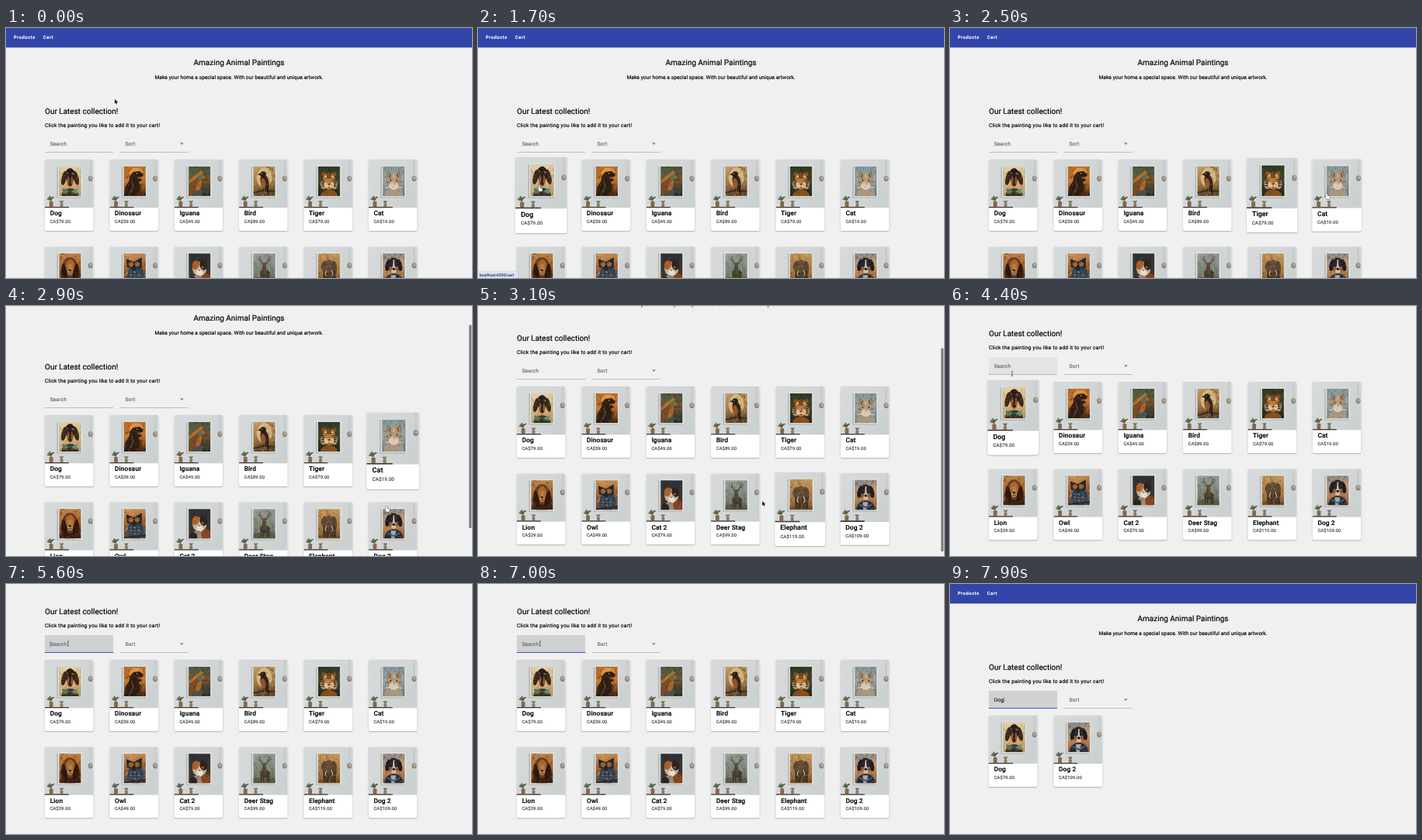
These frames come from a looping animation (600 px wide and 323 px high, 8000 ms). An HTML page with a canvas:

```html
<!DOCTYPE html>
<html lang="en">
<head>
<meta charset="utf-8">
<title>Amazing Animal Paintings</title>
<style>
html, body { margin: 0; width: 100%; height: 100%; overflow: hidden; background: #f0f0f0; }
canvas { display: block; width: 600px; height: 323px; }
</style>
</head>
<body>
<canvas id="stage"></canvas>
<script>
const W = 600, H = 323, LOOP = 8000, STEP = 100;
const canvas = document.getElementById('stage');
const ctx = canvas.getContext('2d');
const dpr = window.devicePixelRatio || 1;
canvas.width = W * dpr;
canvas.height = H * dpr;

const CARD = { x: 50, y: 170, w: 62.6, h: 92, photo: 62.5, dx: 83.35, dy: 112.3 };
const FIELD = { x: 50, y: 138, w: 88.2, h: 23 };
const FOCUS = 4600, TYPE = 7400;

// ---- drawing helpers ----
function rect(x, y, w, h, fill, r = 0) {
  ctx.fillStyle = fill;
  ctx.beginPath();
  ctx.roundRect(x, y, w, h, r);
  ctx.fill();
}
function oval(x, y, rx, ry, fill, turn = 0) {
  ctx.fillStyle = fill;
  ctx.beginPath();
  ctx.ellipse(x, y, rx, ry, turn, 0, 7);
  ctx.fill();
}
function pair(dx, y, rx, ry, fill, turn = 0, cx = 14) {
  oval(cx - dx, y, rx, ry, fill, turn);
  oval(cx + dx, y, rx, ry, fill, -turn);
}
function trace(pts) {
  ctx.beginPath();
  for (let i = 0; i < pts.length; i += 2) ctx.lineTo(pts[i], pts[i + 1]);
}
function poly(pts, fill) {
  trace(pts);
  ctx.fillStyle = fill;
  ctx.fill();
}
function line(pts, color, width) {
  trace(pts);
  ctx.strokeStyle = color;
  ctx.lineWidth = width;
  ctx.stroke();
}
// a hairline outline gives the slightly heavy strokes of the page text
function text(str, x, y, size, { weight = 400, track = 0, color = '#000', align = 'left' } = {}) {
  ctx.font = `${weight} ${size}px Roboto, sans-serif`;
  ctx.letterSpacing = `${track * size}px`;
  ctx.textAlign = align;
  ctx.fillStyle = ctx.strokeStyle = color;
  ctx.lineWidth = .18;
  ctx.fillText(str, x, y);
  ctx.strokeText(str, x, y);
}
function gradient(x0, y0, x1, y1, ...colors) {
  const g = ctx.createLinearGradient(x0, y0, x1, y1);
  colors.forEach((c, i) => g.addColorStop(i / (colors.length - 1), c));
  return g;
}
function random(seed) {
  return () => (seed = (seed * 16807) % 2147483647) / 2147483647;
}

// ---- paintings, each on a 28 x 38 sheet ----
function ears(fill, inner) {
  poly([5, 16, 6, 5, 13, 12], fill);
  poly([23, 16, 22, 5, 15, 12], fill);
  poly([7, 13, 7.3, 8, 10.5, 12], inner);
  poly([21, 13, 20.7, 8, 17.5, 12], inner);
}
function eyes(dx, y, fill, r = 1.2) {
  pair(dx, y, r, r, fill);
  pair(dx, y, r * .5, r * .6, '#0c0a08');
}
function paintDog() {
  oval(14, 38, 11, 10, '#3a2a20');
  pair(7.8, 15, 3.2, 9.5, '#3d261a', .22);
  oval(14, 11, 6.4, 9, '#211b19');
  oval(14, 19, 3.9, 7.5, '#9a5a2c');
  oval(14, 15, 1.6, 7, '#2a1f1a');
  oval(14, 23, 2.1, 1.7, '#120f0f');
  pair(3.1, 8.5, 1.1, .8, '#b56b31');
  eyes(3.2, 11.5, '#7c4a22', 1);
  poly([14, 32, 4, 28, 5, 36], '#47765f');
  poly([14, 32, 24, 28, 23, 36], '#5b8f74');
  oval(14, 32, 2, 2.2, '#294f41');
}
function paintDinosaur() {
  oval(16, 8, 9, 7, '#dd9440');
  poly([0, 38, 2, 26, 7, 18, 7, 13, 12, 7, 20, 6, 25, 10, 24, 13, 17, 14, 24, 17, 19, 20, 21, 28, 20, 38], '#2b1e17');
  poly([17, 14, 24, 13, 18, 16.5], '#a83a1d');
  oval(17, 9, .8, .8, '#f4bd45');
  line([17, 22, 22, 24, 22, 27], '#35241a', 1.5);
  line([10, 18, 12, 26, 8, 34], '#5e3c25', 1.8);
  oval(23, 36, 7, 4, '#4c2b16');
}
function paintIguana() {
  poly([0, 38, 3, 22, 9, 11, 18, 8, 26, 14, 24, 20, 16, 22, 17, 38], '#7f4a27');
  for (let i = 0; i < 8; i++) poly([1 + i * 2, 22 - i * 1.8, 1 + i * 2, 16 - i * 1.6, 5 + i * 2, 18 - i * 1.3], '#bd7633');
  oval(16, 14, 5, 3.6, '#5b6f4c');
  oval(13, 25, 3, 8, '#a8682f', .3);
  oval(19, 13, 1.2, 1.2, '#f1b74b');
  oval(19, 13, .6, .7, '#111');
  line([17, 18, 25, 17], '#3d2416', .7);
  oval(12, 34, 8, 3, '#3f554f', -.3);
}
function paintBird() {
  oval(14, 14, 10, 13, '#d8b77c');
  line([0, 34, 12, 31, 28, 32], '#3c2918', 2);
  poly([17, 32, 21, 38, 18, 22], '#201a18');
  oval(14.5, 20, 5.4, 10, '#2b201a', -.2);
  oval(12.8, 22, 3.2, 7, '#9a5529', -.15);
  oval(12.5, 10, 3.8, 3.7, '#241d1b');
  poly([9.5, 9, 5, 10.3, 9.5, 11.5], '#16110f');
  oval(11.3, 9.3, .6, .6, '#e9c07a');
  line([13, 28, 13, 32], '#1b1410', .8);
}
function paintTiger() {
  pair(6.8, 10, 2.6, 2.8, '#8a4f20');
  pair(7, 23, 4, 6.5, '#b59672');
  oval(14, 38, 11, 8, '#87501f');
  oval(14, 19, 8.5, 11, '#b87433');
  pair(3.3, 24, 3.4, 3.4, '#d9c4a4');
  pair(4, 13, 1.8, 1, '#dbc5a0');
  oval(14, 19, 2.2, 6, '#c58442');
  oval(14, 23, 1.7, 1.1, '#7a4034');
  eyes(3.8, 16, '#d9bd4a', 1);
  for (let i = 0; i < 4; i++) {
    line([11, 8 + i * 2, 14, 9.5 + i * 2, 17, 8 + i * 2], '#1d140e', .9);
    line([4, 16 + i * 3, 8, 18 + i * 2.4], '#1d140e', 1);
    line([24, 16 + i * 3, 20, 18 + i * 2.4], '#1d140e', 1);
  }
}
function paintCat() {
  oval(14, 37, 12, 13, '#a99880');
  ears('#93714f', '#b9917a');
  oval(14, 19, 9.5, 9, '#b2926e');
  oval(14, 25, 6, 5, '#d8cbb9');
  poly([12.4, 10, 15.6, 10, 15, 21, 13, 21], '#c7ab86');
  pair(5, 12, .8, 3, '#77512f', .3);
  pair(8, 20, 2.5, .5, '#77512f', .3);
  eyes(4, 18, '#8fb3ac', 1.6);
  poly([12.8, 21.5, 15.2, 21.5, 14, 23], '#a9685c');
  pair(8, 27, 4, .4, '#e9e2d6', -.2);
}
function paintLion() {
  oval(14, 25, 12, 16, '#3a2013');
  oval(14, 18, 10, 13, '#6d3b1b');
  pair(7, 24, 3, 11, '#2c170e', -.2);
  oval(14, 16, 5.6, 8.5, '#a96a33');
  oval(14, 24, 3.6, 3.6, '#c89a67');
  oval(14, 19, 1.8, 5, '#bd8446');
  oval(14, 22, 1.7, 1.2, '#2d1711');
  eyes(3, 14.5, '#e6b846', .9);
  line([11, 26, 14, 25, 17, 26], '#3a1c10', .8);
}
function paintOwl() {
  oval(15, 27, 10, 13, '#2b3f56');
  poly([3, 7, 13, 11, 23, 5, 23, 18, 13, 22, 4, 18], '#1c2737');
  pair(4, 14, 3.4, 3.4, '#94572a', 0, 13);
  eyes(4, 14, '#eeb03a', 1.6);
  poly([11.9, 15, 14.3, 15, 13, 19.5], '#15110f');
  for (let i = 0; i < 9; i++) oval(9 + (i % 3) * 5, 24 + (i / 3 | 0) * 4, 2, .8, i % 2 ? '#b8702f' : '#456e8b', .5);
  line([0, 37, 28, 34], '#3b2314', 2.2);
}
function paintCat2() {
  oval(14, 38, 11, 11, '#9d8c7e');
  ears('#33261f', '#8a4f34');
  oval(14, 20, 9, 9, '#c9b9a8');
  oval(9, 15, 4.5, 6, '#b4602a', .3);
  oval(19, 15, 4.8, 6.5, '#2b2320', -.3);
  oval(14, 25, 4.4, 3.6, '#eee4d8');
  eyes(4, 18, '#dba83c', 1.3);
  oval(14, 22, 1.2, .8, '#a95f52');
  oval(22, 33, 6, 7, '#8a4822');
  oval(6, 36, 5, 6, '#2b2320');
}
function paintDeer() {
  oval(14, 36, 18, 6, '#585a44');
  for (const s of [-1, 1]) {
    line([14 + s, 13, 14 + s * 5, 9, 14 + s * 6, 3], '#433a2e', .9);
    line([14 + s * 4, 10, 14 + s * 9, 7], '#433a2e', .8);
  }
  oval(15, 26, 6.5, 5, '#463d2f');
  poly([10, 26, 12, 14, 16, 14, 17, 26], '#51452f');
  oval(14, 15, 2.2, 3.4, '#5f4e38');
  pair(3.3, 13, 1.6, .7, '#56452f', .3);
  [10, 13, 18, 20].forEach(x => line([x, 28, x, 37], '#392f22', 1.3));
}
function paintElephant() {
  oval(14, 37, 17, 4, '#76502a');
  oval(15, 22, 9, 10, '#4d3a2b');
  [8, 12, 17, 21].forEach(x => rect(x - 1.5, 25, 3.3, 12, '#3f2f23', 1));
  pair(6, 16, 4, 6.5, '#5c4533', .15);
  oval(14, 15, 4.6, 7, '#684f3a');
  line([14, 18, 14, 27, 15.5, 33], '#54402f', 2.8);
  line([11, 21, 9, 27, 11, 29], '#ecdfc0', 1);
  line([17, 21, 19, 27, 17, 29], '#ecdfc0', 1);
  pair(3, 14, .6, .6, '#1d1510');
}
function paintDog2() {
  oval(14, 38, 12, 12, '#222b3c');
  poly([10, 28, 17, 28, 15, 38, 11, 38], '#b7a692');
  pair(7.2, 15, 3.4, 8, '#171a22', .25);
  oval(14, 14, 7, 8.5, '#20222a');
  poly([13.3, 8, 14.7, 8, 15.4, 18, 12.6, 18], '#cdbfae');
  oval(14, 21, 3.6, 4.6, '#cfc0ad');
  pair(4.3, 20, 1.8, 3.2, '#9c5a2a');
  oval(14, 20, 1.9, 1.4, '#0f0f12');
  eyes(3.5, 13, '#8b5426', .9);
  line([6, 31, 14, 35, 22, 31], '#3a6288', 2);
}

const item = (name, price, paint, ...tones) => ({ name, price, paint, tones });
const items = [
  item('Dog', 79, paintDog, '#e3d2a9', '#d6b988', '#bb935f'),
  item('Dinosaur', 39, paintDinosaur, '#b5672a', '#c57a30', '#4a2a18'),
  item('Iguana', 49, paintIguana, '#4b5844', '#6d5a36', '#2a322e'),
  item('Bird', 89, paintBird, '#c4a06a', '#a57d4b', '#5d452c'),
  item('Tiger', 79, paintTiger, '#2d3726', '#46492c', '#1d2118'),
  item('Cat', 19, paintCat, '#82969b', '#9aa5a2', '#627a80'),
  item('Lion', 29, paintLion, '#c08a4c', '#a5672f', '#3a2114'),
  item('Owl', 49, paintOwl, '#d29a5b', '#a55e29', '#31485e'),
  item('Cat 2', 79, paintCat2, '#28303a', '#3b3734', '#4f3524'),
  item('Deer Stag', 99, paintDeer, '#98a09a', '#828b7f', '#5f6450'),
  item('Elephant', 119, paintElephant, '#c9a05f', '#b0824a', '#7c5731'),
  item('Dog 2', 109, paintDog2, '#7c8c9b', '#cf9a63', '#8a5430'),
];

function drawArt({ paint, tones }, seed) {
  const rnd = random(seed * 7919 + 13);
  const strokes = (n, alpha, size, colors) => {
    ctx.globalAlpha = alpha;
    for (let i = 0; i < n; i++) oval(rnd() * 28, rnd() * 38, size * (.4 + rnd()), size * .35, colors[i % colors.length], rnd() * 3);
    ctx.globalAlpha = 1;
  };
  ctx.save();
  ctx.beginPath();
  ctx.rect(0, 0, 28, 38);
  ctx.clip();
  rect(0, 0, 28, 38, gradient(0, 0, 6, 38, ...tones));
  strokes(40, .45, 2.6, tones);
  paint();
  strokes(110, .3, 1.3, [...tones, '#17110d']);
  ctx.restore();
}

function drawRoom(art, seed) {
  const { w, photo } = CARD;
  ctx.save();
  ctx.beginPath();
  ctx.roundRect(0, 0, w, photo, [1.7, 1.7, 0, 0]);
  ctx.clip();
  rect(0, 0, w, photo, gradient(0, 0, w, photo * .6, '#d6dada', '#d3d7d7', '#cbd0d1'));
  // picture frame
  rect(15.6, 9, 31, 40.5, 'rgba(80,90,92,.3)');
  rect(17, 7.8, 31, 40.6, '#e6e6e2');
  rect(18, 8.6, 29, 38.8, '#c4c1b9');
  ctx.save();
  ctx.translate(18.5, 9);
  drawArt(art, seed);
  ctx.restore();
  // hanging lamp
  line([58.8, 0, 58.8, 21], '#a7a9a5', .4);
  oval(58.8, 24.6, 3, 3.6, '#8b8479');
  oval(59.3, 23.8, 1.8, 2.2, '#b1a899');
  // plants on the table
  for (let i = 0; i < 6; i++) oval(5 + i, 51.5 - (i % 3) * 1.2, .9, 2.6, '#54614a', i * .5 - 1.3);
  rect(5.8, 54, 4.8, 7, '#8a6547', 1);
  for (let i = 0; i < 4; i++) oval(20.3 + i * .8, 54.8, .6, 2.2, '#66745a', i * .5 - .8);
  rect(19.6, 56.5, 3.9, 4.5, '#94785a', .8);
  rect(0, 60.9, 31, 1.6, '#3a3a36');
  ctx.restore();
}

function drawCard(it, x, y, scale) {
  const { w, h } = CARD;
  ctx.save();
  ctx.translate(x + w / 2, y + h / 2);
  ctx.scale(scale, scale);
  ctx.translate(-w / 2, -h / 2);
  ctx.shadowColor = 'rgba(0,0,0,.32)';
  ctx.shadowBlur = 1.8 * dpr;
  ctx.shadowOffsetY = .7 * dpr;
  rect(0, 0, w, h, '#fff', 1.7);
  ctx.shadowColor = 'transparent';
  drawRoom(it, items.indexOf(it) + 1);
  text(it.name, 6.7, 72.2, 8.333, { weight: 500, track: .0125 });
  text(`CA$${it.price}.00`, 6.7, 82.1, 5.833, { track: .01786, color: '#484848' });
  ctx.restore();
}

// ---- timeline ----
function keyed(keys, t) {
  let i = 0;
  while (i < keys.length - 2 && t >= keys[i + 1][0]) i++;
  const [a, b] = [keys[i], keys[i + 1]];
  const k = Math.min(1, Math.max(0, (t - a[0]) / (b[0] - a[0])));
  return a.slice(1).map((v, j) => v + (b[j + 1] - v) * k);
}
const PATH = [
  [0, 140, 92], [1000, 140, 92], [1280, 54, 13], [1350, 54, 13], [1640, 79, 205],
  [1950, 79, 205], [2500, 485, 215], [2700, 490, 260], [2950, 490, 260],
  [3450, 77, 234], [3850, 78, 238], [4150, 80, 140], [4450, 80, 77], [4600, 80, 77],
];
const SCROLL = [[0, 0], [2760, 0], [2800, 8], [2900, 29], [3000, 51], [3100, 66], [3200, 72], [3300, 72]];

const pointer = t => keyed(PATH, t);
const scrollAt = t => t >= TYPE ? 0 : keyed(SCROLL, t)[0];
const typed = t => 'Dog'.slice(0, t < TYPE ? 0 : t < 7600 ? 1 : t < 7700 ? 2 : 3);
const inside = (x, y, b) => x >= b.x && x <= b.x + b.w && y >= b.y && y <= b.y + b.h;
const cell = i => ({ x: CARD.x + i % 6 * CARD.dx, y: CARD.y + (i / 6 | 0) * CARD.dy, w: CARD.w, h: CARD.h });

function hovered(t) {
  if (t >= TYPE) return -1;
  if (t > 2700 && t < 2950) return 5; // hover stays put while scrolling
  const [x, y] = pointer(t);
  return items.findIndex((_, i) => inside(x, y + scrollAt(t), cell(i)));
}
function growth(i, t) {
  let n = 0;
  for (let k = 0; k < 15; k++) n += hovered(Math.max(0, t - k * 10)) === i;
  return 1 + .08 * n / 15;
}

// ---- page parts ----
function drawHead() {
  rect(0, 0, W, 25.2, '#3445aa');
  const nav = { weight: 500, track: .0893, color: '#fff' };
  text('Products', 10, 14.2, 5.833, nav);
  text('Cart', 47.8, 14.2, 5.833, nav);
  text('Amazing Animal Paintings', 300, 47.8, 10, { align: 'center' });
  text('Make your home a special space. With our beautiful and unique artwork.', 300, 65.9, 6.667, { align: 'center', track: .0094 });
  text('Our Latest collection!', 50, 111, 10);
  text('Click the painting you like to add it to your cart!', 50, 128.1, 6.667, { track: .03125 });
}

function drawFields(t, over) {
  const { x, y, w, h } = FIELD;
  const label = { track: .03125, color: '#6a6a6a' };
  const focus = t >= FOCUS, query = typed(t);
  if (focus || over) rect(x, y, w, h, focus ? '#d0d1d1' : '#e4e4e4', [1.7, 1.7, 0, 0]);
  if (focus) rect(x, y + h - 1, w, 1, '#3f51c8');
  else rect(x, y + h - .8, w, .6, '#8b8b8b');
  if (query) text(query, 56.7, 152, 6.667, { track: .03125, color: '#222' });
  else text('Search', 56.7, 152, 6.667, label);
  if (focus && (query || Math.floor((t - 4500) / 500) % 2 === 0)) {
    const end = query ? ctx.measureText(query).width : 0;
    rect(56.7 + end, 145.8, .55, 7.6, '#3f51b5');
  }
  text('Sort', 153.4, 152, 6.667, label);
  rect(146.7, y + h - .8, w, .6, '#8b8b8b');
  poly([224.2, 148.5, 228.6, 148.5, 226.4, 150.8], '#666');
}

function drawPointer(x, y, kind) {
  ctx.save();
  ctx.translate(x, y);
  ctx.lineJoin = 'round';
  if (kind === 'beam') {
    line([-1.2, -3.2, 0, -2.6, 1.2, -3.2], '#222', .6);
    line([0, -2.7, 0, 2.7], '#222', .6);
    line([-1.2, 3.2, 0, 2.6, 1.2, 3.2], '#222', .6);
  } else {
    const hand = kind === 'hand';
    trace(hand
      ? [-.8, -1, 0, -1.5, .8, -1, .8, 1.6, 3.6, 2.2, 4, 3.2, 3.4, 6, 0, 6, -2.4, 3.2, -1.8, 2.4, -.8, 3.2]
      : [0, 0, 0, 5.8, 1.3, 4.6, 2.2, 6.6, 3.2, 6.1, 2.3, 4.2, 4.1, 4.1]);
    ctx.closePath();
    ctx.strokeStyle = hand ? '#222' : '#fff';
    ctx.lineWidth = hand ? .8 : 1;
    ctx.stroke();
    ctx.fillStyle = hand ? '#fff' : '#000';
    ctx.fill();
  }
  ctx.restore();
}

function drawBars(t, scroll) {
  if (t >= 1250 && t < 2000) {
    rect(-1, 314.6, 52.5, 9, '#c3cbdc', 1.5);
    rect(-1, 315, 52, 9, '#dde6f7', 1.5);
    text('localhost:4200/cart', 1.8, 320.7, 5.1, { color: '#3c4049' });
  }
  if (t >= 2800 && t < 4100) {
    ctx.globalAlpha = Math.min(1, (4100 - t) / 300);
    rect(596.2, .6 + .814 * scroll, 3.2, 263, '#7d7d7d', 1.6);
    ctx.globalAlpha = 1;
  }
}

function draw(t) {
  const scroll = scrollAt(t), [px, py] = pointer(t);
  const query = typed(t).toLowerCase();
  const shown = items.filter(it => it.name.toLowerCase().includes(query));
  const overField = inside(px, py + scroll, FIELD);
  const overCart = inside(px, py + scroll, { x: 42, y: 4, w: 26, h: 17 });

  ctx.setTransform(dpr, 0, 0, dpr, 0, 0);
  ctx.textRendering = 'geometricPrecision';
  rect(0, 0, W, H, '#f0f0f0');
  ctx.save();
  ctx.translate(0, -scroll);
  drawHead();
  drawFields(t, overField);
  shown.forEach((it, i) => {
    const { x, y } = cell(i);
    drawCard(it, x, y, growth(i, t));
  });
  ctx.restore();
  drawBars(t, scroll);
  if (t < TYPE) drawPointer(px, py, overField ? 'beam' : hovered(t) >= 0 || overCart ? 'hand' : 'arrow');
}

let start = null, last = -1;
function tick(now) {
  if (start === null) start = now;
  const t = Math.floor((now - start) % LOOP / STEP) * STEP;
  if (t !== last) draw(last = t);
  requestAnimationFrame(tick);
}
draw(0);
requestAnimationFrame(tick);
</script>
</body>
</html>
```
